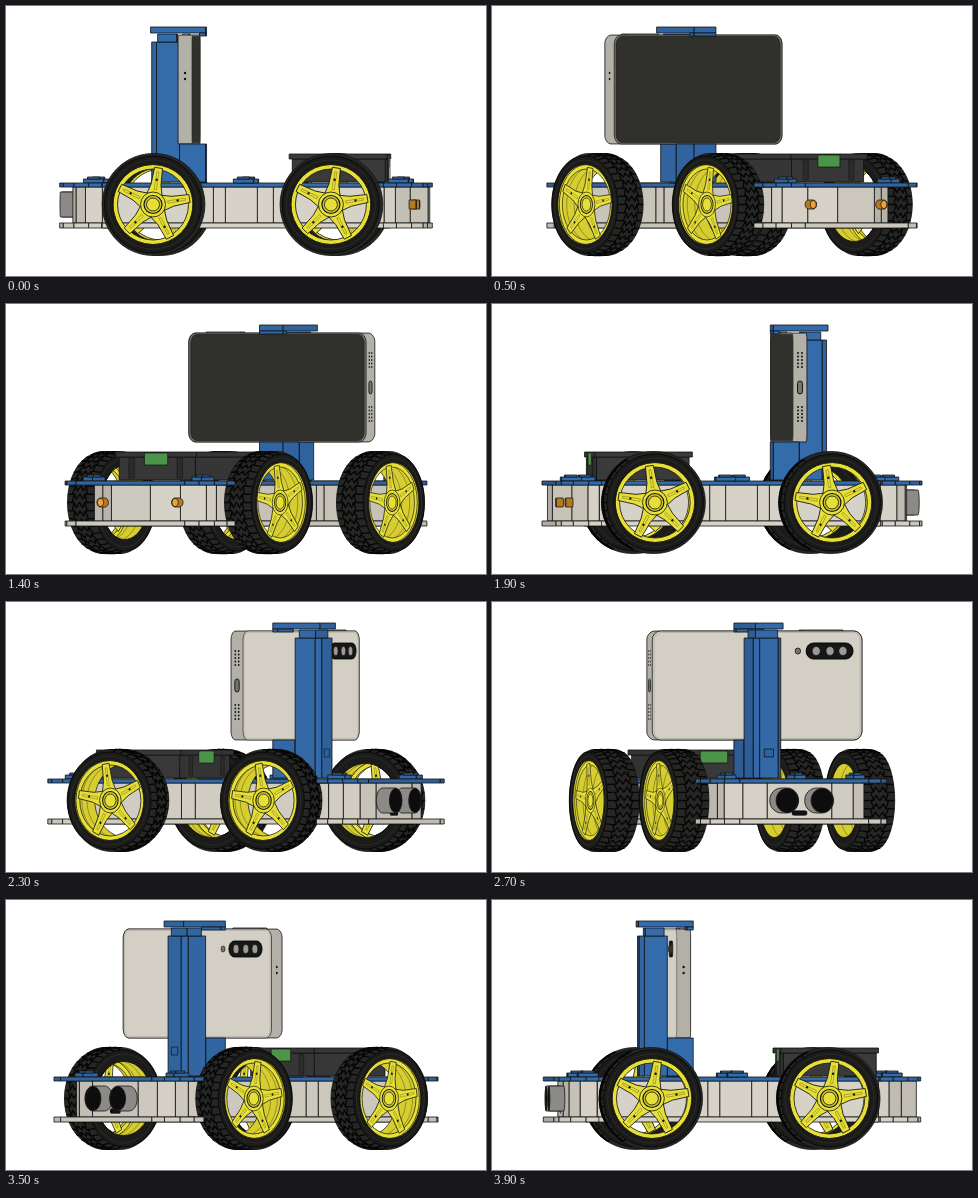
An HTML page with a canvas for the animation above (4000 ms loop, 480x270 px).

```html
<!DOCTYPE html>
<html>
<head>
<meta charset="utf-8">
<style>
html, body { margin: 0; width: 100%; height: 100%; overflow: hidden; background: #fff; }
canvas { display: block; width: 480px; height: 270px; }
</style>
</head>
<body>
<canvas id="stage" width="480" height="270"></canvas>
<script>
// Orthographic turntable: X runs along the car, Z across it, y is the screen row.
const ctx = document.getElementById('stage').getContext('2d');
const BLUE = [52, 107, 170], LIGHT = [214, 210, 199], DARK = [58, 58, 58];
const INK = '#121212', YELLOW = '#e6df38', BARREL = '#d6cd30';
const AXLE = 198.5, TAU = Math.PI * 2;
let c = 1, s = 0;

const sx = (x, z) => 240 + x * c - z * s;

function trace(pts) {
  pts.forEach(([x, y], i) => i ? ctx.lineTo(x, y) : ctx.moveTo(x, y));
  ctx.closePath();
}

function paint(fill, stroke = INK, width = 0.8, rule = 'nonzero') {
  if (fill) { ctx.fillStyle = fill; ctx.fill(rule); }
  if (stroke) { ctx.strokeStyle = stroke; ctx.lineWidth = width; ctx.stroke(); }
}

function shape(pts, fill, stroke, width) {
  ctx.beginPath();
  trace(pts);
  paint(fill, stroke, width);
}

function hull(pts) {
  pts.sort((a, b) => a[0] - b[0] || a[1] - b[1]);
  const half = list => {
    const out = [];
    for (const p of list) {
      while (out.length > 1) {
        const a = out[out.length - 2], b = out[out.length - 1];
        if ((b[0] - a[0]) * (p[1] - a[1]) - (b[1] - a[1]) * (p[0] - a[0]) > 0) break;
        out.pop();
      }
      out.push(p);
    }
    return out.slice(0, -1);
  };
  return [...half(pts), ...half([...pts].reverse())];
}

const shade = (rgb, k) => `rgb(${rgb.map(v => Math.round(v * k)).join()})`;
const sym = list => [...list.map(([x, z]) => [x, -z]), ...[...list].reverse()];
const rect = (x0, x1, z0, z1) => [[x0, z0], [x1, z0], [x1, z1], [x0, z1]];

// Upright prism over a counter-clockwise plan; only faces turned to the viewer.
function prism(plan, y0, y1, rgb) {
  plan.forEach((a, i) => {
    const b = plan[(i + 1) % plan.length];
    const xa = sx(...a), xb = sx(...b);
    if (xa - xb < 0.05) return;
    const k = (xa - xb) / Math.hypot(a[0] - b[0], a[1] - b[1]);
    shape([[xa, y0], [xb, y0], [xb, y1], [xa, y1]], shade(rgb, 0.8 + 0.2 * k));
  });
}

const box = (x0, x1, z0, z1, y0, y1, rgb) => prism(rect(x0, x1, z0, z1), y0, y1, rgb);

// Draw in a plane across the car (u = Z) or along it (u = X).
function plane(x, z, across, draw) {
  ctx.save();
  ctx.transform(across ? -s : c, 0, 0, 1, sx(x, z), 0);
  draw();
  ctx.restore();
}

function disc(u, y, r, fill, stroke, width) {
  ctx.beginPath();
  ctx.arc(u, y, r, 0, TAU);
  paint(fill, stroke, width);
}

function pill(u, y, w, h, r, fill, stroke, width) {
  ctx.beginPath();
  ctx.roundRect(u, y, w, h, r);
  paint(fill, stroke, width);
}

function ring(x, z, r) {
  return Array.from({ length: 48 }, (_, i) => {
    const a = i / 48 * TAU;
    return [sx(x + r * Math.cos(a), z), AXLE + r * Math.sin(a)];
  });
}

function endRing(x, z, y, r) {
  return Array.from({ length: 24 }, (_, i) => {
    const a = i / 24 * TAU;
    return [sx(x, z + r * Math.cos(a)), y + r * Math.sin(a)];
  });
}

function tube(x0, x1, z, r, fill, cap) {
  shape(hull([...endRing(x0, z, AXLE, r), ...endRing(x1, z, AXLE, r)]), fill);
  if ((x1 - x0) * s > 0) shape(endRing(x1, z, AXLE, r - 0.5), cap);
}

function spokes() {
  ctx.beginPath();
  ctx.arc(0, AXLE, 40, 0, TAU);
  ctx.moveTo(35.5, AXLE);
  ctx.arc(0, AXLE, 35.5, 0, TAU);
  paint(YELLOW, INK, 0.8, 'evenodd');
  for (let i = 0; i < 5; i++) {
    ctx.save();
    ctx.translate(0, AXLE);
    ctx.rotate(i / 5 * TAU - 1.42);
    shape([[9, -8], [20, -5], [37, -4], [37, 4], [20, 5], [9, 8]], YELLOW);
    shape([[15, -1.2], [33, -1], [33, 1], [15, 1.2]], null, '#77721c', 0.5);
    disc(25, 0, 1.2, INK, null);
    ctx.restore();
  }
  disc(0, AXLE, 12.5, YELLOW);
  disc(0, AXLE, 9, '#cfc72f', INK, 1.2);
  disc(0, AXLE, 6.5, YELLOW);
}

function wheel(x, side) {
  const outer = side * c > 0;
  const zo = 118 * side, zi = 84 * side;
  const face = outer ? zo : zi, back = outer ? zi : zo;
  const at = t => zo + (zi - zo) * t;
  const rim = outer ? 40 : 37;

  ctx.beginPath();
  trace(hull([...ring(x, zo, 49), ...ring(x, at(0.15), 51), ...ring(x, at(0.85), 51), ...ring(x, zi, 49)]));
  trace(ring(x, face, rim));
  paint('#262625', INK, 0.8, 'evenodd');

  // tread blocks
  const dot = (a, t, r = 51) => [sx(x + r * Math.cos(a), at(t)), AXLE + r * Math.sin(a)];
  ctx.beginPath();
  for (let i = 0; i < 38; i++) {
    const a = i / 38 * TAU;
    if (Math.cos(a) * s < 0.04) continue;
    [[a, 0, 49], [a, 0.3], [a + 0.1, 0.38], [a, 0.5], [a + 0.1, 0.62], [a, 0.7], [a, 1, 49]]
      .forEach((p, j) => ctx[j ? 'lineTo' : 'moveTo'](...dot(...p)));
    ctx.moveTo(...dot(a, 0.3));
    ctx.lineTo(...dot(a + 0.165, 0.22));
    ctx.moveTo(...dot(a, 0.7));
    ctx.lineTo(...dot(a + 0.165, 0.78));
  }
  paint(null, '#050505', 1.3);

  ctx.beginPath();
  trace(ring(x, face, 48.5));
  trace(ring(x, face, rim));
  paint('#1b1b1a', '#050505', 0.8, 'evenodd');
  shape(ring(x, face, 44.5), null, '#343432', 0.6);

  // inside of the rim
  ctx.save();
  ctx.beginPath();
  trace(ring(x, face, rim));
  ctx.clip();
  ctx.beginPath();
  ctx.rect(0, 0, 480, 270);
  trace(ring(x, back, 37));
  paint(BARREL, INK, 0.7, 'evenodd');
  for (const t of [0.3, 0.6]) shape(ring(x, face + (back - face) * t, 38), null, '#6b6618', 0.6);
  plane(x, outer ? at(0.06) : at(0.2), false, spokes);
  ctx.restore();
  shape(ring(x, face, rim), null);
}

const cornerPlate = [[-184, 70], [-180, 85], [-169, 96], [-154, 100], [-141, 100]];
const frontWall = [[-172, 35], [-168, 60], [-158, 76], [-141, 76]];
const rearWall = [[141, 76], [152, 72], [166, 50], [183, 25]];
const midWall = [-141, -30, -18, 14, 30, 141].map(x => [x, 76]);
const mirror = list => [...list].reverse().map(([x, z]) => [-x, z]);

function deck(wall, plate) {
  prism(sym(wall), 181, 217, LIGHT);
  prism(sym(plate), 177, 181, BLUE);
  prism(sym(plate), 217, 222, LIGHT);
}

function tabs(x) {
  for (const z of [-70, 70]) {
    box(x - 10, x + 10, z - 6, z + 6, 173, 177, BLUE);
    box(x - 6, x + 6, z - 4, z + 4, 171, 173, BLUE);
  }
}

// Runs parts listed back to front for a positive direction, reversed otherwise.
const order = (dir, ...parts) => (dir > 0 ? parts : parts.reverse()).forEach(f => f());

function front() {
  tabs(-150);
  order(s,
    () => order(c, ...[-19, 19].map(z => () => tube(-170, -185, z, 12.5, '#8b8a86', '#0d0d0d'))),
    () => {
      deck(frontWall, cornerPlate);
      if (s < 0) plane(-172, 0, true, () => pill(-9, 208, 18, 6, 3, '#111', '#eee', 0.7));
    });
}

function rear() {
  tabs(155);
  order(s,
    () => deck(rearWall, mirror(cornerPlate)),
    () => [-48, 48].forEach(z => tube(165, 172, z, 4.5, '#b5791f', '#eda33a')));
}

function phone() {
  const slab = x => {
    const pts = [];
    for (let i = 0; i < 24; i++) {
      const a = (i + 0.5) / 24 * TAU, u = Math.cos(a), v = Math.sin(a);
      pts.push([sx(x, Math.sign(u) * 105 + 9 * u), 83.5 + Math.sign(v) * 45.5 + 9 * v]);
    }
    return pts;
  };
  box(-60, -54, 50, 95, 28, 30, LIGHT);
  shape(hull([...slab(-64), ...slab(-50)]), '#b3b0a7');
  if (s > 0) {
    plane(-50, 0, true, () => {
      pill(-114, 29, 228, 109, 9, '#77756f');
      pill(-111.5, 30.5, 223, 106, 8, '#30302c', '#191917', 0.7);
    });
  } else {
    plane(-64, 0, true, () => {
      pill(-114, 29, 228, 109, 9, '#d3cfc5');
      pill(-112, 30.5, 224, 106, 8, null, '#a5a299', 0.6);
    });
    plane(-67, 0, true, () => {
      pill(52, 41, 51, 16, 8, '#171717', '#000', 1);
      for (const u of [63, 78, 92]) disc(u, 49, 4.5, '#9b9a96');
      disc(43, 49, 3, '#77756f');
    });
  }
  // ports on the short ends
  if (c < 0) {
    plane(-57, -114, false, () => {
      pill(-2.5, 77, 5, 13, 2.5, '#77756f', INK, 1);
      for (const y of [49, 103])
        for (let i = 0; i < 5; i++) for (const u of [-2, 2]) disc(u, y + i * 3.5, 1, INK, null);
    });
  } else {
    plane(-57, 114, false, () => [67, 73].forEach(y => disc(0, y, 1.2, INK, null)));
  }
}

function column() {
  prism(sym([[-94, 10], [-89, 15], [-66, 15]]), 36, 176, BLUE);
  box(-88, -69, -12, 12, 28, 36, BLUE);
  if (s < 0) plane(-94, 0, true, () => pill(-5, 147, 10, 8, 0, '#2d62a0'));
}

function holder() {
  box(-66, -40, -15, 15, 138, 176, BLUE);
  box(-95, -40, -15, 15, 21, 27, BLUE);
  box(-46, -40, -15, 15, 27, 30, BLUE);
}

function battery() {
  box(48, 141, -49, 49, 153, 176, DARK);
  box(45, 143, -52, 52, 148, 153, DARK);
  plane(s > 0 ? 143 : 46, 0, true, () => {
    pill(-15, 149, 30, 12, 0, '#4c9449');
    for (const u of [-34, 28]) pill(u, 154, 7, 20, 0, '#2c2c2c', INK, 0.6);
  });
}

function middle() {
  const axle = side => () => order(s, () => wheel(-89, side), () => wheel(89, side));
  order(c,
    axle(-1),
    () => {
      deck(midWall, [[-141, 82], [141, 82]]);
      tabs(0);
      order(s, column, () => { phone(); holder(); }, battery);
    },
    axle(1));
}

function draw(ms) {
  const step = Math.floor(ms / 100) % 40;
  const angle = (2 + 9.07 * step) * Math.PI / 180;
  c = Math.cos(angle);
  s = Math.sin(angle);
  ctx.fillStyle = '#fff';
  ctx.fillRect(0, 0, 480, 270);
  ctx.lineJoin = 'round';
  order(s, front, middle, rear);
}

const start = performance.now();
function tick() {
  draw(performance.now() - start);
  requestAnimationFrame(tick);
}
tick();
</script>
</body>
</html>
```
